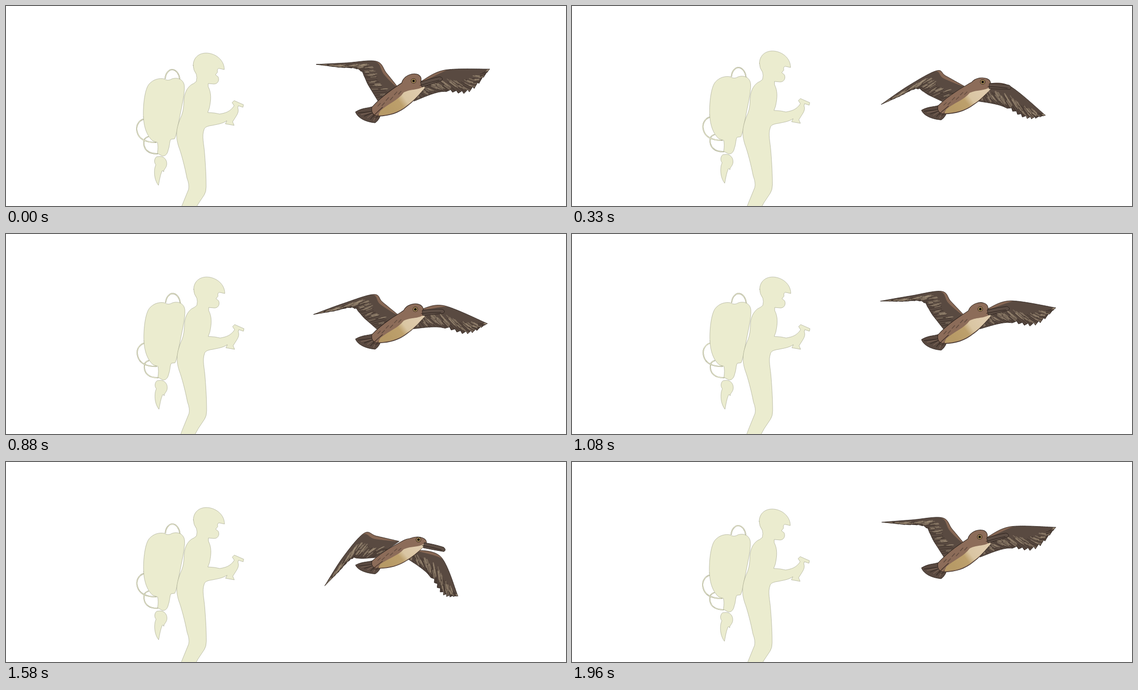
These frames come from a looping animation (1080x387 px, 2 s). An HTML page with a canvas:

```html
<!DOCTYPE html>
<html lang="en">
<head>
<meta charset="utf-8">
<title>Jetpack and bird</title>
<style>
  html, body { margin: 0; width: 100%; height: 100%; overflow: hidden; background: #fff; }
  canvas { display: block; }
</style>
</head>
<body>
<canvas id="stage" width="1080" height="387"></canvas>
<script>
const ctx = document.getElementById('stage').getContext('2d');
const LOOP = 2000, FPS = 24, BEAT = 24, DOWN = 17, INK = '#2b211c';

const man = new Path2D(`M361 115C361 100 372 91 386 91C402 91 421 103 421 123L412 121
  C408 120 407 124 408 128L404 133L409 137C412 143 409 151 401 151L390 150L390 156
  C396 168 396 180 392 198L389 206L402 207L412 209C423 207 432 205 440 193L436 187L440 183
  L458 191L457 196L448 193L447 197Q450 204 444 213L437 224L440 231L423 228L426 222
  C417 228 407 229 398 231C390 232 383 234 382 239C377 252 382 268 383 285C385 310 386 330 386 350
  Q386 360 382 366L370 384L360 402L332 406L339 387L352 355Q354 346 349 333C345 312 338 285 333 272
  C326 250 329 236 336 218C345 200 342 185 344 175C347 161 354 153 362 150L367 146Q369 138 367 132Q361 124 361 115Z`);
const pack = new Path2D(`M265 215C264 190 268 160 276 151C284 142 295 139 305 141Q312 146 320 141
  C332 137 343 143 344 155C345 170 338 198 334 220C330 240 328 252 325 257L318 258C315 262 316 270 313 278
  C311 289 305 291 301 290L292 285Q294 272 292 264L283 261C272 252 266 235 265 215Z`);
const flame = new Path2D(`M297 291C305 291 311 298 310 307C309 314 304 316 304 321Q303 317 301 319
  C297 328 296 338 294 347C287 338 285 325 287 313L289 307C285 303 286 295 290 292Z`);
const hoses = new Path2D(`M307 140C308 130 314 123 321 123C329 124 334 132 335 141
  M265 219C254 223 250 234 253 244C256 256 266 264 289 264M266 261C264 278 275 286 292 286M266 260Q269 254 274 253`);

const body = new Path2D(`M806 154C800 146 785 141 768 149C750 160 728 172 706 194
  Q704 208 718 209C740 208 757 204 774 191C788 182 798 170 806 161Z`);
const belly = new Path2D(`M807 156C796 165 782 161 767 168C756 182 738 187 722 200L718 208
  C740 207 757 203 774 190C788 181 798 170 807 161Z`);
const tail = new Path2D('M714 190C700 197 690 193 674 202C677 210 689 219 712 221Q722 215 724 200Z');
const beak = new Path2D('M-3 -5Q18 -6 35 -4Q42 0 37 4Q15 5 -3 5Z');

const mix = (a, b, v) => [a[0] + (b[0] - a[0]) * v, a[1] + (b[1] - a[1]) * v];
const ease = x => (1 - Math.cos(Math.PI * x)) / 2;

// Point on the parabola through its places with the wings up, halfway and down
const HALFWAY = .55;
function travel(f, up, mid, down) {
  const a = (f - HALFWAY) * (f - 1) / HALFWAY;
  const b = f * (1 - f) / (HALFWAY * (1 - HALFWAY));
  const c = f * (f - HALFWAY) / (1 - HALFWAY);
  return up.map((_, i) => a * up[i] + b * mid[i] + c * down[i]);
}

// Catmull-Rom curve, u from 0 to 1
function along(pts, u) {
  const last = pts.length - 1, s = u * last;
  const i = Math.max(0, Math.min(last - 1, Math.floor(s))), t = s - i;
  const [a, b, c, d] = [-1, 0, 1, 2].map(k => pts[Math.max(0, Math.min(last, i + k))]);
  return [0, 1].map(k => b[k] + .5 * t * (c[k] - a[k] +
    t * (2 * a[k] - 5 * b[k] + 4 * c[k] - d[k] + t * (3 * (b[k] - c[k]) + d[k] - a[k]))));
}

function seeded(seed) {
  return () => (seed = (seed * 16807) % 2147483647) / 2147483647;
}

function line(pts, color, width) {
  ctx.beginPath();
  pts.forEach(p => ctx.lineTo(...p));
  ctx.strokeStyle = color;
  ctx.lineWidth = width;
  ctx.stroke();
}

function fillPath(path, fill, edge, width = .9) {
  ctx.fillStyle = fill;
  ctx.fill(path);
  if (!edge) return;
  ctx.strokeStyle = edge;
  ctx.lineWidth = width;
  ctx.stroke(path);
}

function polygon(pts) {
  const path = new Path2D();
  pts.forEach(p => path.lineTo(...p));
  path.closePath();
  return path;
}

function leftWing(f) {
  const tip = travel(f, [598, 113], [596, 189], [619, 247]);
  const wrist = travel(f, [714, 107], [703, 125], [688, 140]);
  const inner = travel(f, [734, 130], [721, 135], [714, 145]);
  const elbow = travel(f, [681, 124], [664, 160], [667, 193]);
  const shoulder = [758, 160 - 7 * f], root = [718 - 6 * f, 185];
  const [midX, midY] = mix(wrist, tip, .5);
  return {
    lead: [shoulder, inner, wrist, [midX - 2 * f, midY - 6 * f], tip],
    trail: [root, mix(elbow, root, .5), elbow, mix(elbow, tip, .5), tip],
    tooth: .05, slant: .1, seed: 39595
  };
}

function rightWing(f) {
  const tip = travel(f, [933, 122], [914, 210], [863, 266]);
  const bend = travel(f, [846, 124], [844, 154], [838, 189]);
  const elbow = travel(f, [838, 166], [830, 193], [809, 219]);
  const outer = travel(f, [893, 167], [878, 217], [836, 264]);
  return {
    lead: [travel(f, [800, 146], [800, 150], [785, 174]), bend, tip],
    trail: [travel(f, [787, 184], [783, 184], [773, 188]), elbow, outer, tip],
    tooth: .13, slant: .16, seed: 87109
  };
}

function drawWing({ lead, trail, tooth, slant, seed }) {
  const at = (u, v) => mix(along(lead, u), along(trail, u), v);
  const front = [], back = [], strip = [];
  for (let i = 0; i <= 140; i++) {
    const u = i / 140;
    front.push(at(u, 0));
    back.unshift(at(u, u > .4 ? 1 - tooth * (u * 15 % 1) : 1));
    strip.unshift(at(u * .55, .13 * Math.sin(Math.PI * u)));
  }
  const outline = polygon([...front, ...back]);
  fillPath(outline, '#594a41');
  ctx.save();
  ctx.clip(outline);
  fillPath(polygon([...front.slice(0, 78), ...strip]), '#866754');

  const feather = (u, v, length, color, width) =>
    line([0, .5, 1].map(s => at(Math.min(1, u + s * length * slant * 1.6), v + s * length)), color, width);
  const random = seeded(seed);
  for (let i = 0; i < 32; i++) feather(i / 32, .45 + .1 * random(), .5, '#3d312a', 1);
  for (let i = 0; i < 60; i++) {
    feather(random(), .38 + .38 * random(), .12 + .12 * random(), 'rgba(168,150,126,.5)', 1.2 + 1.2 * random());
  }
  ctx.restore();
  ctx.strokeStyle = INK;
  ctx.lineWidth = .9;
  ctx.stroke(outline);
}

function drawTorso(f, head) {
  const chest = ctx.createLinearGradient(790, 162, 738, 203);
  [['#dfcbad', 0], ['#d9c5a2', .4], ['#bda06c', .58], ['#b79a66', 1]].forEach(([c, at]) => chest.addColorStop(at, c));

  ctx.save();
  // the trunk flattens as the wings go down
  ctx.translate(0, 175);
  ctx.scale(1, 1 - .22 * (f - .5));
  ctx.translate(0, -175);
  fillPath(tail, '#594940', INK);
  for (let i = 0; i < 6; i++) {
    const end = [679 + 6 * i, 204 + 2.7 * i];
    line([mix([716, 200], end, .3), end], i % 2 ? '#80695a' : '#342923', 1.1);
  }
  ctx.strokeStyle = INK;
  ctx.lineWidth = 1.8;
  ctx.stroke(body);
  ctx.stroke(head);
  fillPath(body, '#8c6c59');
  fillPath(head, '#8c6c59');
  fillPath(belly, chest);
  for (let i = 0; i < 6; i++) {
    const x = 722 + 8 * i, y = 187 - 5 * i + 4 * (i % 2);
    line([[x, y], [x - 5, y + 5]], '#5b473c', 1.2);
  }
  line([[726, 194], [713, 205], [708, 210], [715, 212], [718, 207]], '#44342b', 1.3);
  ctx.restore();
}

function drawBird(f) {
  const eye = travel(f, [786, 145], [792, 147], [796, 151]);
  const [jawX, jawY, tilt] = travel(f, [804, 151, -17], [808, 155, 3], [809, 163, 13]);
  const turn = tilt * Math.PI / 180;
  const head = new Path2D();
  head.ellipse(eye[0] - 4, eye[1] + 4, 19, 12, turn / 2 - .2, 0, 7);

  drawWing(leftWing(f));
  drawWing(rightWing(f));
  drawTorso(f, head);

  ctx.save();
  ctx.translate(jawX, jawY);
  ctx.rotate(turn);
  fillPath(beak, '#5d4e45', INK);
  line([[-6, 1], [14, 1], [32, 2]], INK, 1);
  ctx.restore();

  [[5, '#30251d'], [4, '#b99a62'], [2.5, '#15110e']].forEach(([r, color]) => {
    const disc = new Path2D();
    disc.arc(...eye, r, 0, 7);
    fillPath(disc, color);
  });
}

function drawMan(lift) {
  const pale = '#ebeccf', edge = '#8b8c73';
  ctx.save();
  ctx.translate(lift, -8 * lift);
  [[edge, 2.1], [pale, 1.2]].forEach(([color, width]) => {
    ctx.strokeStyle = color;
    ctx.lineWidth = width;
    ctx.stroke(hoses);
  });
  [pack, man, flame].forEach(part => fillPath(part, pale, edge, .5));
  ctx.restore();
}

// Steady, slightly eased downstroke; quicker upstroke
function flapAt(beat) {
  if (beat >= DOWN) return 1.05 * ease(((BEAT - beat) / (BEAT - DOWN)) ** 1.2);
  const x = (beat / DOWN) ** .85;
  return 1.05 * (x + ease(x)) / 2;
}

function draw(now) {
  const tick = Math.floor(now % LOOP / 10) * 10;
  const step = Math.floor((tick + 4.9) * FPS / 1000) % (2 * BEAT);
  const half = step / BEAT;
  const lift = half < 1 ? Math.sin(Math.PI / 2 * half) : 1 - ease(half - 1);

  ctx.fillStyle = '#fff';
  ctx.fillRect(0, 0, 1080, 387);
  drawMan(lift);
  drawBird(flapAt(step % BEAT));
}

ctx.lineJoin = ctx.lineCap = 'round';
const start = performance.now();
function play() {
  draw(performance.now() - start);
  requestAnimationFrame(play);
}
play();
</script>
</body>
</html>
```
